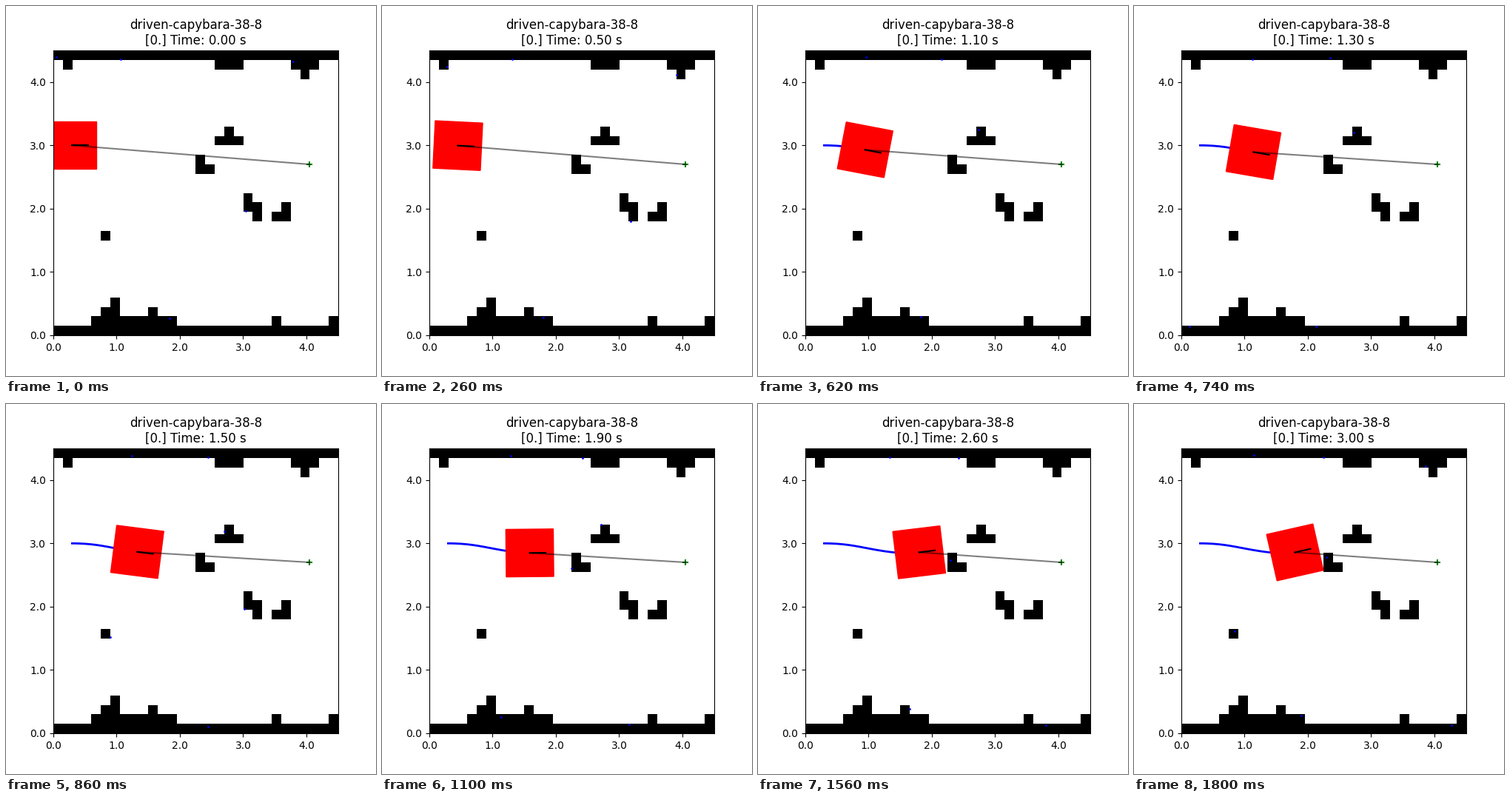
Write a matplotlib script that moves like this. It is 500 px wide and 500 px high and loops after 1.9 s.

```python
import numpy as np
import matplotlib.pyplot as plt
from matplotlib.animation import FuncAnimation
from matplotlib.patches import Polygon

CELL, N = 0.15, 30
SIDE = CELL * N
GOAL = (4.05, 2.7)
STEPS = 30           # simulation steps of 0.1 s
TICK = 20            # ms per drawn frame

grid = np.zeros((N, N))


def bar(row, col, width=1, bump=None, rise=1):
    """A run of cells, with one more cell above or below it if asked."""
    grid[row, col:col + width] = 1
    if bump is not None:
        grid[row + rise, col + bump] = 1


# Walls, and what grows out of them
bar(0, 0, N)
bar(N - 1, 0, N)
bar(1, 4, 9)
bar(2, 5, 2, bump=1)
for row, col in ((2, 10), (1, 23), (1, 29), (28, 1)):
    bar(row, col)
bar(28, 17, 3)
bar(28, 25, 3, bump=1, rise=-1)

# Free-standing blocks
bar(10, 5)
bar(20, 17, 3, bump=1)
bar(17, 15, 2, bump=0)
bar(13, 20, 2, bump=0)
bar(12, 21)
bar(12, 23, 2, bump=1)


def spline(t, keys, vals):
    """Smooth curve through key points; slopes come from the neighbours."""
    keys, vals = np.array(keys), np.array(vals)
    m = np.gradient(vals, keys, edge_order=2)
    i = np.clip(np.searchsorted(keys, t, side="right") - 1, 0, len(keys) - 2)
    h = keys[i + 1] - keys[i]
    s = (t - keys[i]) / h
    return ((1 + 2 * s) * (1 - s) ** 2 * vals[i] + s * (1 - s) ** 2 * h * m[i]
            + s * s * (3 - 2 * s) * vals[i + 1] + s * s * (s - 1) * h * m[i + 1])


# Key points of the drive; y follows from rolling along the heading
KEYS = (0, 0.5, 1.1, 1.5, 1.9, 2.3, 2.55, 3)
FINE = 10
time = np.linspace(0, STEPS / 10, STEPS * FINE + 1)
xs = spline(time, KEYS, (0.3, 0.452, 0.947, 1.328, 1.589, 1.77, 1.797, 1.797))
turn = spline(time, KEYS, (0, -0.049, -0.189, -0.127, 0.01, 0.071, 0.11, 0.222))
drop = np.tan((turn[1:] + turn[:-1]) / 2) * np.diff(xs)
ys = 3 + np.concatenate([[0], np.cumsum(drop)])
POSES = np.column_stack([xs, ys, turn])[::FINE]

fan = np.radians(180 - 39.8 * np.arange(5))
BEAMS = np.concatenate([fan, -fan])
RANGES = np.linspace(0, 5, 100)


def scan(x, y, heading):
    """First occupied sample along each beam."""
    hits = []
    for a in heading + BEAMS:
        px, py = x + RANGES * np.cos(a), y + RANGES * np.sin(a)
        inside = (px >= 0) & (px < SIDE) & (py >= 0) & (py < SIDE)
        px, py = px[inside], py[inside]
        hit = np.flatnonzero(grid[(py / CELL).astype(int), (px / CELL).astype(int)])
        if len(hit):
            hits.append((px[hit[0]], py[hit[0]]))
    return np.array(hits).reshape(-1, 2)


SCANS = [scan(*p) for p in POSES]
CORNERS = 0.375 * np.array([[-1, -1], [1, -1], [1, 1], [-1, 1]])

fig, ax = plt.subplots(figsize=(5, 5), dpi=100)
ax.imshow(grid, cmap="binary", origin="lower", extent=(0, SIDE, 0, SIDE),
          interpolation="nearest", vmin=0, vmax=1)
ax.set(xlim=(0, SIDE), ylim=(0, SIDE), xticks=range(5), yticks=range(5))
ax.xaxis.set_major_formatter("{x:.1f}")
ax.yaxis.set_major_formatter("{x:.1f}")
title = ax.set_title("")

trail, = ax.plot([], [], color="blue", lw=2, zorder=1)
body = Polygon(CORNERS, closed=True, color="red", zorder=1.5)
ax.add_patch(body)
sight, = ax.plot([], [], color="black", alpha=0.5, lw=1.5)
nose, = ax.plot([], [], color="black", lw=1.5)
ax.scatter(*GOAL, marker="+", color="green")
dots = ax.scatter([], [], s=1, color="blue", zorder=2)


def step_at(n):
    """Steps alternate between one and five ticks; the last one is held."""
    return min(n // 6 * 2 + (n % 6 > 0), STEPS)


def update(n):
    k = step_at(n)
    x, y, a = POSES[k]
    c, s = np.cos(a), np.sin(a)
    title.set_text(f"driven-capybara-38-8\n[0.] Time: {k / 10:.2f} s")
    trail.set_data(POSES[:k + 1, 0], POSES[:k + 1, 1])
    body.set_xy(CORNERS @ np.array([[c, s], [-s, c]]) + (x, y))
    sight.set_data([x, GOAL[0]], [y, GOAL[1]])
    nose.set_data([x, x + 0.25 * c], [y, y + 0.25 * s])
    dots.set_offsets(SCANS[k])
    return title, trail, body, sight, nose, dots


anim = FuncAnimation(fig, update, frames=95, interval=TICK, repeat=True)
plt.show()
```
